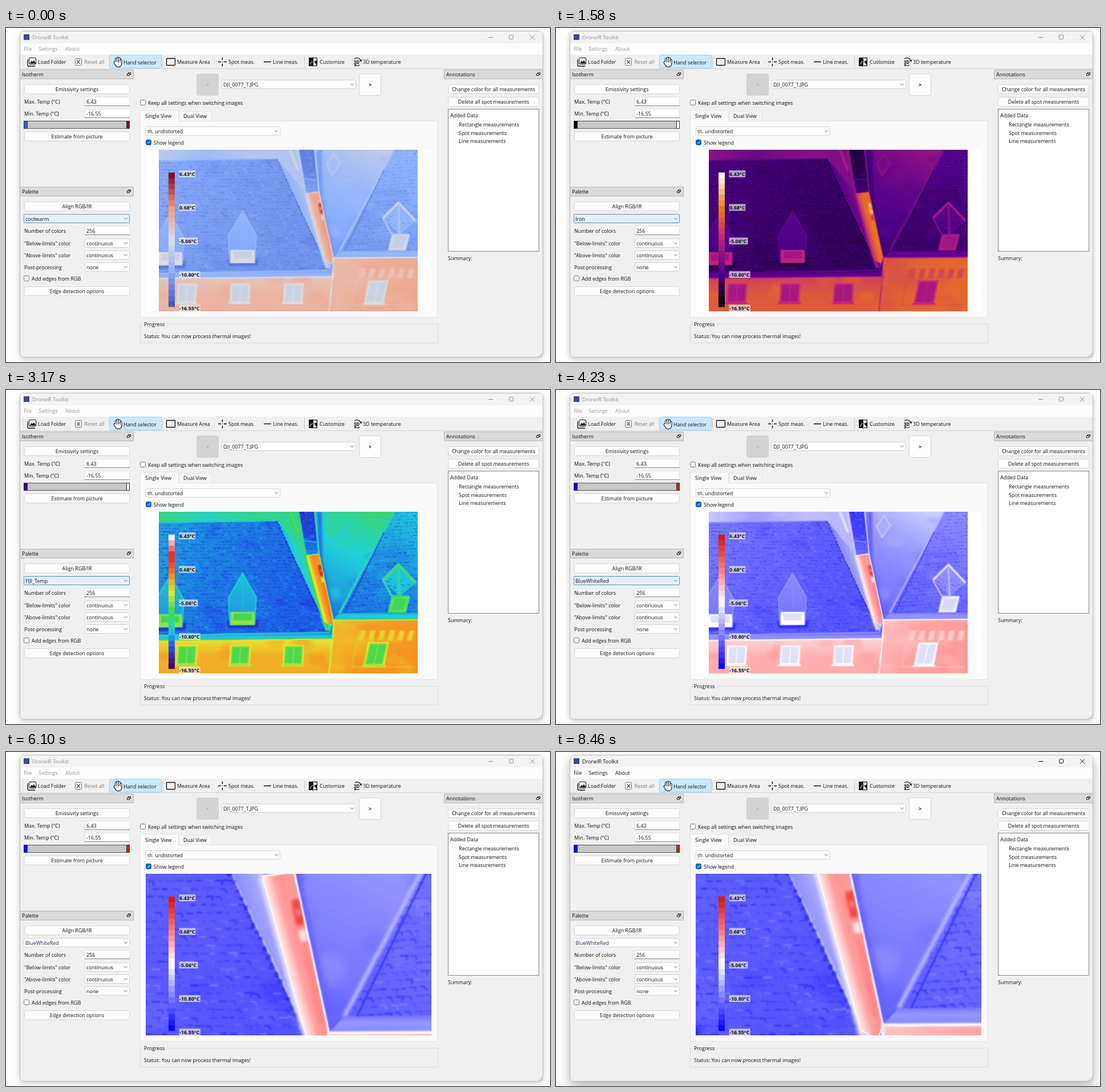
An HTML page with a canvas that plays this animation: 954 px wide and 587 px high, repeating every 9580 ms.

```html
<!DOCTYPE html>
<html lang="en">
<head>
<meta charset="utf-8">
<title>DroneIR Toolkit</title>
<style>
html, body { margin: 0; width: 100%; height: 100%; overflow: hidden; background: #fff; }
#win { position: absolute; left: 24px; top: 5px; width: 918px; height: 574px; border-radius: 7px;
  box-shadow: 0 3px 11px rgba(0,0,0,.22); }
#win.on { box-shadow: 0 9px 20px rgba(0,0,0,.3); }
svg, canvas { position: absolute; left: 0; top: 0; }
canvas { left: 245px; top: 214px; }
text { font: 8.95px "Open Sans", "Noto Sans", sans-serif; fill: #111; white-space: pre; }
.b { font-weight: 700; }
.mid { text-anchor: middle; }
.ink { fill: var(--ink); }
.line { fill: none; stroke: var(--ink); }
</style>
</head>
<body>
<div id="win"></div>
<svg id="ui" width="954" height="587" viewBox="0 0 954 587"></svg>
<canvas id="view" width="501" height="284"></canvas>
<svg id="legend" width="954" height="587" viewBox="0 0 954 587"></svg>
<script>
const start = performance.now();
const $ = id => document.getElementById(id);
const clamp = (v, lo = 0, hi = 1) => Math.max(lo, Math.min(hi, v));

/* ---------- window ---------- */
const text = (x, y, s, more = '') => `<text x="${x}" y="${y + 3.3}" ${more}>${s}</text>`;
const rect = (x, y, w, h, fill, line, r = 0, more = '') => line
  ? `<rect x="${x + .5}" y="${y + .5}" width="${w - 1}" height="${h - 1}" fill="${fill}" stroke="${line}" rx="${r}" ${more}/>`
  : `<rect x="${x}" y="${y}" width="${w}" height="${h}" fill="${fill}" rx="${r}" ${more}/>`;
const path = (d, w = 1, stroke = '#111', fill = 'none', more = '') =>
  `<path d="${d}" fill="${fill}" stroke="${stroke}" stroke-width="${w}" ${more}/>`;
const button = (x, y, w, s) => rect(x, y, w, 17, '#fdfdfd', '#d6d6d6', 3) + text(x + w / 2, y + 8.5, s, 'class="mid"');
const square = (x, fill, s, more) => rect(x, 80, 39, 39, fill, '#d2d2d2', 3) + text(x + 19.5, 100, s, more);
const chevron = (x, y) => path(`M${x - 3} ${y - 1.5}l3 3l3 -3`, .9, '#555');
const combo = (x, y, w, s) => rect(x, y, w, 16, '#fff', '#d2d2d2', 2) + text(x + 3, y + 8.3, s) + chevron(x + w - 7, y + 8);
const edit = (x, y, w, s) => rect(x, y, w, 16, '#fff', '#e2e2e2', 1) + rect(x, y + 15, w, 1, '#868686') + text(x + 3, y + 8.2, s);
const row = (y, label, control, value) => text(32, y, label) + control(138, Math.round(y) - 9, 79, value);
const check = (x, y, s, on) => rect(x, y, 10, 10, on ? '#0067c0' : '#fbfbfb', on ? '#0067c0' : '#777', 2) +
  (on ? path(`M${x + 2.5} ${y + 5}l2 2l3.5 -4`, 1, '#fff') : '') + text(x + 14, y + 5.6, s);
const dock = (x, y, w, s) => rect(x, y, w, 17, '#dadada', '#b9b9b9') + text(x + 4, y + 8.8, s) +
  rect(x + w - 10, y + 5, 5, 4, '#dadada', '#222') + rect(x + w - 12, y + 7, 5, 4, '#fff', '#222');
const hand = (c, w) => path('M193 62V54.5M196 61V52.5M199 61V53.5M201.5 62V56.5M190.5 60.5l2.5 4q1 2.5 4 2.5q4 0 4.500 -5l-8 -1z',
  w, c, c, 'stroke-linecap="round" stroke-linejoin="round"');

function chrome() {
  const parts = [
    rect(24, 5, 918, 574, '#f0f0f0', '#bdbdbd', 7),
    path('M25 27V12q0 -6 6 -6h904q6 0 6 6v15z', 0, 'none', '#f3f3f3'),
    rect(25, 27, 916, 20, '#fdfdfd'),
    rect(25, 71, 916, 1, '#d4d4d4'),
    rect(31, 11, 10, 10, '#3a4b92'),
    text(46, 16.6, 'DroneIR Toolkit', 'class="ink"'),
    '<path class="line" d="M846 16.5h8M919 12.5l8 8m0 -8l-8 8"/>',
    '<rect class="line" x="882.5" y="12.5" width="7" height="7" rx="1"/>',
    text(31, 37, 'File', 'class="ink"'), text(57.5, 37, 'Settings', 'class="ink"'), text(104, 37, 'About', 'class="ink"'),

    // toolbar
    path('M29.5 51v17', 1, '#b5b5b5', 'none', 'stroke-dasharray="1 2"'),
    path('M38 55v10q0 2 2 2h11', 1.3), rect(40, 52, 13, 12, '#fff', '#111', 1.5),
    path('M42 62l3 -4l2 2l2 -3l3 5z', .5, '#111', '#111'),
    text(56, 60, 'Load Folder'),
    rect(121, 53, 12, 13, '#fff', '#777', 1), path('M124 56.5l6 6.5m0 -6.5l-6 6.5', 1.2, '#555'),
    text(137.5, 60, 'Reset all', 'fill-opacity=".5"'),
    rect(181, 47, 92, 24, '#cce8ff', '#99d1ff', 2),
    hand('#111', 4), hand('#fff', 1.9), path('M194.5 59v-4M197.5 58.5v-5M200.2 59v-3', .7),
    text(206, 60.2, 'Hand selector'),
    rect(274, 50, 1, 19, '#c9c9c9'),
    rect(281, 53, 16, 13, 'none', '#111', 1, 'stroke-width="1.3"'), text(300, 60, 'Measure Area'),
    path('M379.5 52v4M379.5 63v4M372 59.5h5M382 59.5h5M379 59.5h1', 1.5), text(390, 60, 'Spot meas.'),
    path('M452 59.5h13', 1.5), text(468, 60, 'Line meas.'),
    rect(523, 50, 1, 19, '#c9c9c9'),
    rect(531, 52, 7, 15, '#111'), path('M540 52.6h5.4v13.8H540M538.5 51v17', 1.1),
    path('M533 64l4.5 -6', 1, '#fff'), path('M540 59l5 6v-8z', 0, 'none', '#111'),
    text(550, 60, 'Customize'),
    path('M611 54a7.5 7.5 0 0 1 11.5 4M620 65a7.5 7.5 0 0 1 -8 0M620.5 56.5l2.3 2l1.2 -3M614 63.5l-2.5 1l.5 3', 1.1),
    text(615, 60, '3D', 'class="mid b" style="font-size:8px"'),
    text(626, 60, '3D temperature'),

    // left docks
    dock(24, 73, 200, 'Isotherm'),
    button(32, 99, 185, 'Emissivity settings'),
    row(130, 'Max. Temp (°C)', edit, '6.43'),
    row(151, 'Min. Temp (°C)', edit, '-16.55'),
    rect(31, 163, 186, 14, '#c8c8c8', '#555'),
    rect(31, 163, 7, 14, '#00f', '#333', 0, 'id="low"'), rect(211, 163, 6, 14, '#f00', '#333', 0, 'id="high"'),
    button(32, 182, 185, 'Estimate from picture'),
    dock(24, 279, 200, 'Palette'),
    button(32, 305, 185, 'Align RGB/IR'),
    rect(31, 327, 186, 16, '#fff', '#d2d2d2', 2),
    rect(31, 327, 186, 16, '#e5f1fb', '#3c93d6', 1, 'id="hover"'),
    text(34, 335.6, '', 'id="name"'), chevron(210, 335),
    row(357, 'Number of colors', edit, '256'),
    row(378.5, '"Below-limits" color', combo, 'continuous'),
    row(399.5, '"Above-limits" color', combo, 'continuous'),
    row(420.5, 'Post-processing', combo, 'none'),
    check(31, 435, 'Add edges from RGB'),
    button(32, 454, 185, 'Edge detection options'),

    // centre
    square(334, '#d3d3d3', '&lt;', 'class="mid" fill-opacity=".3"'),
    combo(378, 91, 236, 'DJI_0077_T.JPG'),
    square(619, '#fdfdfd', '&gt;', 'class="mid b"'),
    check(235, 126, 'Keep all settings when switching images'),
    rect(235, 163, 522, 346, '#fafafa', '#e4e4e4'),
    rect(303, 146, 58, 18, '#f5f5f5', '#e4e4e4'), rect(235, 144, 68, 20, '#fafafa', '#e4e4e4', 2),
    rect(236, 162, 66, 3, '#fafafa'),
    text(244, 154.5, 'Single View'), text(311, 155, 'Dual View'),
    combo(245, 173, 236, 'th. undistorted'),
    check(245, 196, 'Show legend', true),
    rect(235, 520, 523, 34, 'none', '#dcdcdc'), rect(240, 516, 42, 9, '#f0f0f0'),
    text(242, 521, 'Progress'), text(242, 541.8, 'Status: You can now process thermal images!'),

    // right dock
    dock(768, 73, 174, 'Annotations'),
    button(775, 99, 160, 'Change color for all measurements'),
    button(775, 121, 160, 'Delete all spot measurements'),
    rect(775, 142, 160, 251, '#fff', '#828790'),
    text(779, 153.8, 'Added Data'),
    ...['Rectangle', 'Spot', 'Line'].map((s, i) => text(794, 170 + 14.2 * i, s + ' measurements')),
    text(775, 404.8, 'Summary:'),
  ];
  for (let i = 0; i < 3; i++)
    for (let j = 0; j <= i; j++) parts.push(rect(939 - 3 * j, 571 + 2.5 * i, 1.5, 1.5, '#a8a8a8'));
  $('ui').innerHTML = parts.join('');
}

/* ---------- palettes: evenly spaced stops, cold to hot ---------- */
const palettes = {
  coolwarm: '#3f5cc9 #8db0fe #dddddd #f4987a #8e0822',
  Artic: '#10168f #35a2de #5fe2f2 #55a0a6 #955c37 #d66c20 #f4b070 #fdeecb',
  Iron: '#00000a #50008a #c02080 #f08010 #fffff0',
  Rainbow: '#0b0b3c #2244b8 #38828c #90ba20 #f0c028 #f57c30 #ee5064 #f5dccf',
  FIJI_Temp: '#460073 #1c50e8 #20d0d8 #40d850 #e8e830 #f88020 #e82018 #fff0f0',
  BlueWhiteRed: '#0505ff #8282ff #ffffff #ff7a7a #d81a0a'
};

function canvas(w, h) {
  const c = document.createElement('canvas');
  c.width = w; c.height = h;
  return c.getContext('2d', { willReadFrequently: true });
}

function ramp(stops) {
  const g = canvas(256, 1), f = g.createLinearGradient(0, 0, 256, 0);
  stops.split(' ').forEach((c, i, all) => f.addColorStop(i / (all.length - 1), c));
  g.fillStyle = f;
  g.fillRect(0, 0, 256, 1);
  return g.getImageData(0, 0, 256, 1).data;
}

/* ---------- heat field, drawn in window coordinates ---------- */
const S = 2.5, X0 = 268, Y0 = 214, X1 = 722, Y1 = 498, W = X1 - X0, H = Y1 - Y0;
let seed = 7;
const rnd = () => (seed = seed * 16807 % 2147483647) / 2147483647;
const heat = (t, a = 1) => { const v = Math.round(t * 255); return `rgba(${v},${v},${v},${a})`; };
const mix = (a, b, k) => a.map((v, i) => v + (b[i] - v) * k);
const move = (p, dx, dy = 0) => [p[0] + dx, p[1] + dy];

function field() {
  const g = canvas(W * S, H * S);
  g.scale(S, S);
  g.translate(-X0, -Y0);

  const trace = pts => { g.beginPath(); pts.forEach(p => g.lineTo(...p)); };
  const blend = (a, b, ...ts) => {
    const f = g.createLinearGradient(...a, ...b);
    ts.forEach((t, i) => f.addColorStop(i / (ts.length - 1), heat(t)));
    return f;
  };
  const poly = (t, ...pts) => { trace(pts); g.fillStyle = t.addColorStop ? t : heat(t); g.fill(); };
  const line = (t, w, ...pts) => { trace(pts); g.strokeStyle = heat(t); g.lineWidth = w; g.stroke(); };
  const soft = (px, draw) => { g.filter = `blur(${px * S}px)`; draw(); g.filter = 'none'; };
  const inside = (pts, draw) => { g.save(); trace(pts); g.clip(); draw(); g.restore(); };
  const mottle = (pts, lo, hi, n = 60, a = .25) => inside(pts, () => soft(3.5, () => {
    for (let i = 0; i < n; i++) {
      g.fillStyle = heat(rnd() < .5 ? lo : hi, a);
      g.beginPath();
      g.ellipse(X0 + rnd() * W, Y0 + rnd() * H, 8 + rnd() * 16, 4 + rnd() * 8, 0, 0, 7);
      g.fill();
    }
  }));
  const bricks = (pts, tilt, a = .5) => inside(pts, () => {
    g.lineCap = 'round';
    for (let r = 0; r < 52; r++)
      for (let x = X0 - r % 2 * 3.5; x < X1; x += 7) {
        const y = 190 + r * 5.8 + (x - 400) * tilt + rnd() * .8, from = x + rnd() * 1.5;
        g.lineWidth = .7 + rnd() * .9;
        g.strokeStyle = heat(rnd() < .75 ? .05 : .28, a * (.25 + rnd()));
        g.beginPath();
        g.moveTo(from, y);
        g.lineTo(from + 2 + rnd() * 3.5, y + 3 * tilt);
        if (rnd() < .4) g.lineTo(from + 4, y + 2.5);
        g.stroke();
      }
  });

  // key points of the view
  const nw = [X0, Y0], ne = [X1, Y0], sw = [X0, Y1], se = [X1, Y1], foot = [566, Y1];
  const ridgeL = [X0, 233], ridge = [476, 230], eave = [567, 426], eaveL = [X0, 431];
  const corner = [574, 404], bend = [573, 437], valley = [680, Y0], nook = [585, 392];
  const neckL = [526, 291], neckR = [549, 288], tipL = [558, 408];

  // back walls
  poly(blend(nw, [520, Y0], .39, .31, .37, .36), nw, ne, se, sw);
  mottle([nw, [513, Y0], ridge, ridgeL], .28, .46);

  // left roof
  const roof = [ridgeL, ridge, eave, eaveL];
  poly(blend(ridgeL, eave, .23, .18, .15), ...roof);
  mottle(roof, .1, .25);
  bricks(roof, -.005);
  line(.28, 2, ridgeL, ridge);

  // flashing beside the roof
  poly(blend([505, 330], [548, 315], .24, .3, .44), ridge, neckL, tipL, corner, move(eave, 3));
  poly(.36, [470, Y0], [513, Y0], neckL, ridge);
  soft(1.5, () => { line(.5, 3, [498, Y0], [512, 250]); line(.44, 2, [511, Y0], neckL); });
  for (let k = 0; k < 1; k += .024 + rnd() * .012) {
    g.fillStyle = heat(.04, .3 + rnd() * .4);
    g.fillRect(...move(mix(ridge, eave, k), -1.5 - rnd()), 2.5 + rnd(), 2 + rnd() * 2);
  }

  // smooth face and right roof
  const face = [[541, Y0], valley, nook, corner, neckR];
  poly(blend([560, 390], [650, Y0], .2, .25, .3, .4), ...face);
  mottle(face, .18, .36, 70);
  soft(2, () => line(.19, 8, [550, Y0], mix(neckR, corner, .1), corner));
  const right = [valley, ne, [X1, 394], nook];
  poly(blend(nook, ne, .18, .21, .28), ...right);
  mottle(right, .14, .3);
  bricks(right, -.07, .42);
  soft(1, () => line(.36, 3, valley, nook));
  line(.1, 1.2, mix(valley, move(nook, 9), .2), move(nook, 9));

  // skylight
  const pane4 = [[562, 240], [575, 221], [586, 238], [572, 259]];
  soft(1, () => { poly(.33, ...pane4); line(.41, 2, ...pane4, pane4[0]); });

  // dark shaft above the warm joint
  const shaft = [[513, Y0], [541, Y0], neckR, neckL];
  poly(blend([525, Y0], neckL, .1, .13, .22), ...shaft);
  bricks(shaft, .06);
  soft(.5, () => { line(.42, 1.8, shaft[1], neckR); line(.38, 1.8, shaft[0], neckL); line(.3, 1.2, [518, 264], [545, 268]); });

  // warm joint
  const joint = [neckL, neckR, corner, move(corner, -4, 10), tipL];
  const core = k => move(mix(neckR, corner, k), -3.5);
  soft(1.2, () => line(.45, 5, neckL, tipL, move(tipL, 6, 14)));
  poly(blend([538, 352], [556, 347], .5, .56, .68, .71), ...joint);
  inside(joint, () => soft(1, () => {
    line(.69, 11, core(0), core(.2));
    line(.88, 6, core(.17), core(.33));
    line(.7, 2.5, core(.23), core(.27));
    line(.55, 5, core(.36), core(.43));
    line(.72, 5, core(.5), core(.95));
  }));
  line(.5, 1.3, neckL, neckR, corner);

  // openings: a leaning frame, glass, cross bar and sill
  const quad = (x, y, w, h, lean, m) => [[x + lean + m, y + m], [x + lean + w - m, y + m], [x + w - m, y + h - m], [x + m, y + h - m]];
  const opening = (x, y, w, h, lean = 0) => soft(.7, () => {
    const frame = quad(x, y, w, h, lean, 3);
    poly(.56, ...quad(x, y, w, h, lean, 0));
    poly(.44, ...frame);
    line(.5, 1.8, ...frame, frame[0]);
    line(.5, 1.6, mix(frame[0], frame[1], .5), mix(frame[3], frame[2], .5));
    line(.47, 2, [x - 2, y + h], [x + w + 2, y + h]);
  });

  // gabled dormers
  const dormer = (x, y) => {
    const house = [[x - 22, y + 92], [x - 25, y + 43], [x, y], [x + 24, y + 42], [x + 21, y + 91]];
    soft(2, () => line(.06, 5, move(house[0], -3, -8), move(house[0], 0, 2), move(house[4], 3, 2), move(house[4], 4, -8)));
    poly(blend([x, y], house[0], .27, .21), ...house);
    soft(.7, () => { line(.31, 1.6, ...house); line(.27, 1.4, [x, y], [x, y + 66]); });
    soft(.5, () => { poly(.5, ...quad(x - 21, y + 68, 42, 23, 0, 0)); poly(.43, ...quad(x - 20, y + 67, 40, 20, 0, 4)); });
  };
  dormer(415, 322);
  dormer(288, 326);

  // dormer on the right roof
  const gable = [[661, 334], [688, 307], [718, 339]], low = [690, 363];
  poly(.27, ...gable, low);
  bricks([...gable, low], .5, .4);
  soft(.9, () => {
    poly(.47, ...quad(670, 362, 31, 29, 7, 0));
    poly(.42, ...quad(670, 362, 31, 29, 7, 5));
    line(.47, 3.4, ...gable);
    line(.39, 2.6, gable[0], move(low, -13), low, mix(gable[1], low, .1));
  });

  // eaves and walls
  const wallL = [[X0, 440], bend, foot, sw], wallR = [corner, [X1, 403], se, foot];
  poly(blend([0, 427], [0, 440], .2, .28, .25), eaveL, eave, corner, bend, wallL[0]);
  poly(blend([0, 390], [0, 404], .22, .29, .25), nook, [X1, 391], wallR[1], corner);
  poly(blend([0, 440], [0, 496], .59, .65, .66), ...wallL);
  poly(blend(corner, [700, 490], .62, .68, .69), ...wallR);
  soft(.6, () => {
    line(.33, 1.6, eaveL, eave);
    line(.47, 2, wallL[0], bend);
    line(.49, 2.2, wallR[1], corner, bend, foot);
  });
  [wallL, wallR].forEach(w => mottle(w, .6, .73, 120));

  // recess with battlements
  soft(.8, () => {
    for (let x = 622; x < X1; x += 17) poly(.6, ...quad(x - 4, 423, 9, 17, 4, 0));
    line(.62, 1.5, [619, 424], [606, 487], [716, 487]);
  });

  for (let x = 298; x < 500; x += 93.5) opening(x, 448, 36, 36, 2);
  opening(627, 443, 36, 42, 8);

  const out = canvas(W * S, H * S);
  out.drawImage(g.canvas, 0, 0);
  out.filter = 'blur(1.3px)';
  out.drawImage(g.canvas, 0, 0);
  return out.getImageData(0, 0, W * S, H * S);
}

function tint(src, lut) {
  const g = canvas(src.width, src.height), img = g.createImageData(src.width, src.height);
  for (let i = 0; i < src.data.length; i += 4)
    for (let c = 0; c < 4; c++) img.data[i + c] = lut[src.data[i] * 4 + c];
  g.putImageData(img, 0, 0);
  return g.canvas;
}

/* ---------- legend ---------- */
const BANDS = 24;
const bar = Array.from({ length: BANDS }, (_, i) =>
  rect(285, 254 + i * 236 / BANDS, 11, 236 / BANDS + .3, '#000', null, 0, 'class="band"'));
const labels = ['6.43', '0.68', '-5.06', '-10.80', '-16.55'].map((s, i) => {
  const y = 256.3 + i * 59;
  return rect(303.5, y - 6, 12 + s.length * 4.2, Math.min(12, Y1 - y + 6), '#f0f0f4', null, 0, 'fill-opacity=".68"') +
    text(304, y, s + '°C', 'class="b"');
});

chrome();
$('legend').innerHTML = [...bar, ...labels].join('');
const source = field();
const looks = Object.entries(palettes).map(([name, stops]) => {
  const lut = ramp(stops);
  const at = t => { const k = Math.round(t * 255) * 4; return `rgb(${lut[k]},${lut[k + 1]},${lut[k + 2]})`; };
  return { name, image: tint(source, lut), at };
});
const bands = document.querySelectorAll('.band');
const view = $('view').getContext('2d');

/* ---------- motion: everything moves on a steady beat ---------- */
const LOOP = 9580, BEAT = 264.4, LEAD = 12;
const PIVOT = [579.2, 341.6], REST = [0, 0], DOWN = [21, 58], UP = [7, -14];
const ease = k => { k = clamp(k); return k * k * (3 - 2 * k); };

function show(n) {
  const look = looks[n < 16 ? Math.min(4, Math.floor(n / 3)) : 5];
  const hover = clamp(Math.min((20 - n) / 3, .85 + .15 * n));
  const zoom = 1.25 ** (n < 20 ? 0 : clamp(n - 19, 2, 4));
  const pan = mix(mix(REST, DOWN, ease((n - 24) / 4)), UP, ease((n - 28) / 4));
  const active = clamp((n - 24) * .7);

  view.setTransform(1, 0, 0, 1, 0, 0);
  view.fillStyle = '#fff';
  view.fillRect(0, 0, 501, 284);
  view.imageSmoothingQuality = 'high';
  view.translate(PIVOT[0] + pan[0] - 245, PIVOT[1] + pan[1] - Y0);
  view.scale(zoom, zoom);
  view.drawImage(look.image, X0 - PIVOT[0], Y0 - PIVOT[1], W, H);

  bands.forEach((b, i) => b.setAttribute('fill', look.at(1 - i / (BANDS - 1))));
  $('low').setAttribute('fill', look.at(0));
  $('high').setAttribute('fill', look.at(1));
  $('hover').setAttribute('opacity', hover);
  $('name').textContent = look.name;
  $('name').style.fill = hover ? '#111' : '#361a52';
  const v = Math.round(145 - 130 * active);
  document.body.style.setProperty('--ink', `rgb(${v},${v},${v})`);
  $('win').className = active ? 'on' : '';
}

let shown;
function tick() {
  const t = (performance.now() - start) % LOOP;
  const n = Math.min(32, Math.floor((t + LEAD) / BEAT));
  if (n !== shown) show(shown = n);
  requestAnimationFrame(tick);
}
tick();
</script>
</body>
</html>
```
